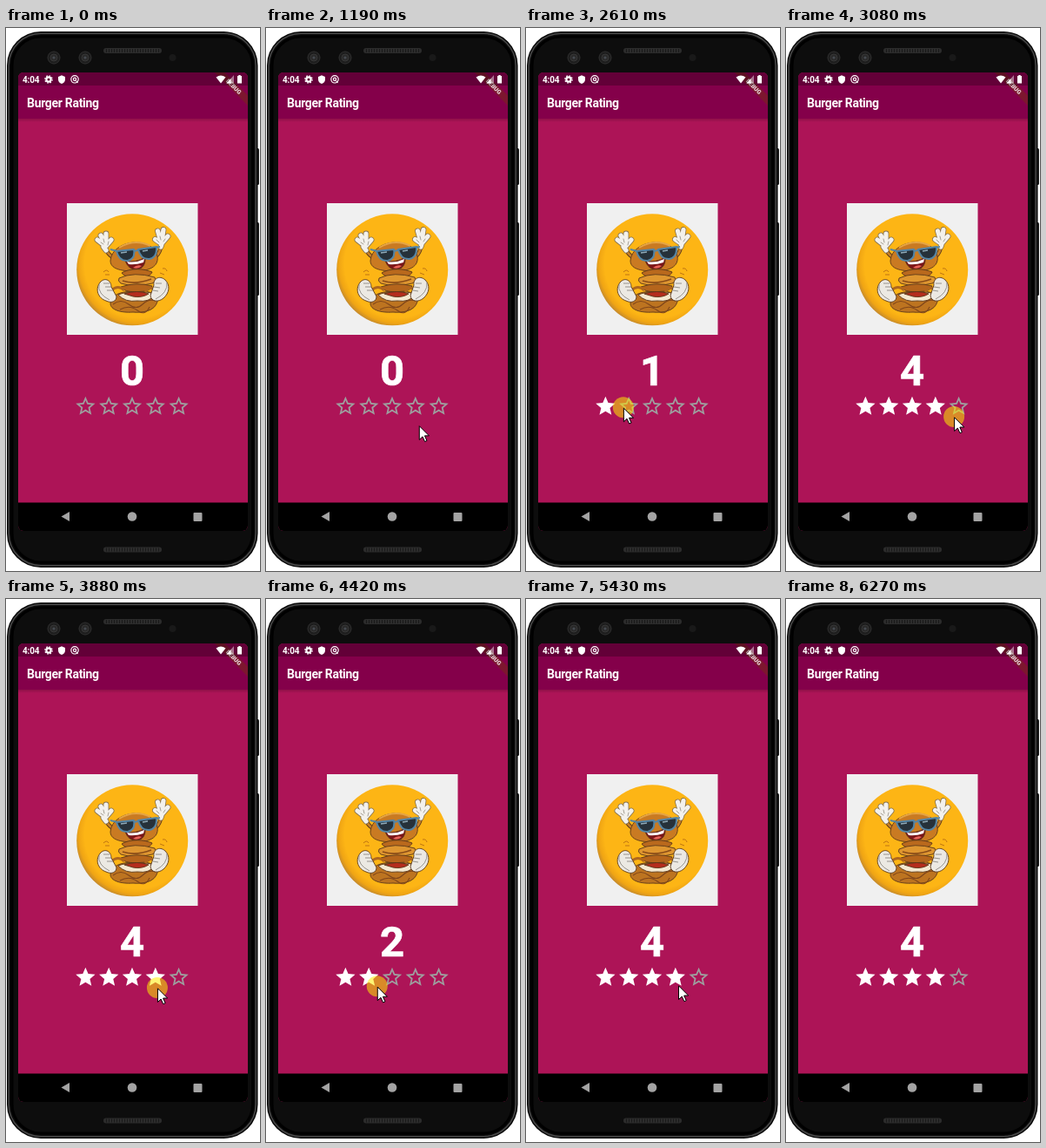
An HTML page for the animation above (6.92 s loop, 292 px wide and 623 px high).

```html
<!DOCTYPE html>
<html lang="en">
<head>
<meta charset="utf-8">
<title>Burger Rating</title>
<style>
  html, body { margin: 0; width: 100%; height: 100%; overflow: hidden; background: #fff; }
  svg { display: block; width: 100%; height: 100%; font-family: Roboto, sans-serif; }
</style>
</head>
<body>
<svg viewBox="0 0 292 623">
  <defs>
    <radialGradient id="badge" cx=".55" cy=".45" r=".57">
      <stop offset=".84" stop-color="#fdb515"/>
      <stop offset=".93" stop-color="#f0a514"/>
      <stop offset="1" stop-color="#c4892c"/>
    </radialGradient>
    <linearGradient id="shade" x2="0" y2="1">
      <stop stop-color="#000" stop-opacity=".18"/>
      <stop offset="1" stop-color="#000" stop-opacity="0"/>
    </linearGradient>
    <clipPath id="screen"><rect x="14" y="51" width="264" height="526" rx="6"/></clipPath>
    <g id="lens">
      <circle r="7" fill="#1d1d1d" stroke="#303030"/>
      <circle r="4" fill="#292929" stroke="#3d3d3d" stroke-width=".8"/>
      <circle r="1.6" fill="#454a50"/>
    </g>
    <g id="speaker" fill="none" stroke-linecap="round">
      <path d="M115 0H176" stroke="#2c2c2c" stroke-width="6"/>
      <path d="M115 0H177" stroke="#191919" stroke-width="4" stroke-dasharray="1 2" stroke-linecap="butt"/>
    </g>
    <path id="fingersL" d="M114 250L105 243M114 248L109 238M115 247L115 236M115 250L121 243M112 251L115 255"/>
    <path id="fingersR" d="M178 247L171.500 242.500M178 245L174.500 233M179 245L181 231.500M180 246L186 239M179 248L178 251"/>
    <path id="shoeL" d="M108 292C114 285 121 290 121 297L127 308C127 314 121 316 115 313C106 310 102 300 108 292Z"/>
    <path id="shoeR" d="M183 289C176 283 169 288 170 295L166 307C167 314 175 315 181 310C188 304 189 295 183 289Z"/>
  </defs>

  <!-- phone -->
  <rect x="286" y="138" width="5" height="42" rx="1.500" fill="#1c1c1c"/>
  <rect x="286" y="223" width="5" height="84" rx="1.500" fill="#1c1c1c"/>
  <rect x="1" y="4" width="288.500" height="615" rx="39" fill="#080808"/>
  <rect x="3.200" y="6.200" width="284" height="610.500" rx="37" fill="#0b0b0b" stroke="#484848" stroke-width="1.500"/>
  <rect x="7" y="10" width="276.500" height="603" rx="33" fill="#0d0d0d" stroke="#000" stroke-width="3"/>
  <use href="#lens" x="55" y="34"/>
  <use href="#lens" x="91" y="34"/>
  <circle cx="191.500" cy="34" r="4" fill="#191919"/>
  <use href="#speaker" y="26"/>
  <use href="#speaker" y="598.500"/>

  <!-- app -->
  <g clip-path="url(#screen)">
    <rect x="14" y="51" width="264" height="526" fill="#ad1457"/>
    <rect x="14" y="104" width="264" height="4" fill="url(#shade)"/>
    <rect x="14" y="51" width="264" height="53" fill="#84004a"/>
    <text x="24" y="90.700" font-size="14" font-weight="600" letter-spacing="-.3" fill="#fff">Burger Rating</text>
    <g transform="translate(278 51) rotate(45)">
      <rect x="-27" y="18.800" width="54" height="8.100" fill="#7c1c28" fill-opacity=".8"/>
      <text y="25.300" font-size="6.800" font-weight="900" fill="#fff" fill-opacity=".85" text-anchor="middle">DEBUG</text>
    </g>
    <rect x="14" y="51" width="264" height="15" fill-opacity=".25"/>
    <g fill="#fff">
      <text x="19" y="62.700" font-size="10" font-weight="600" letter-spacing="-.2">4:04</text>
      <circle cx="49" cy="59" r="2.600" fill="none" stroke="#fff" stroke-width="2.200"/>
      <circle cx="49" cy="59" r="4.200" fill="none" stroke="#fff" stroke-width="1.200" stroke-dasharray="1.650"/>
      <path d="M64 54.300L68 56V59C68 61.500 66.300 63.300 64 64C61.700 63.300 60 61.500 60 59V56Z"/>
      <g fill="none" stroke="#fff" stroke-width="1.200">
        <circle cx="79" cy="58.800" r="4.200"/>
        <circle cx="79" cy="58.800" r="1.600"/>
        <path d="M80.500 60.500L82.500 63"/>
      </g>
      <path d="M241.500 56.500Q247 52.300 252.500 56.500L247 63.500Z"/>
      <path d="M262 54V63.500H253.500Z" fill-opacity=".45"/>
      <path d="M258.500 58V63.500H253.500Z"/>
      <path d="M266 55H267.300V54H269.700V55H271V63.500H266Z"/>
    </g>

    <!-- picture -->
    <rect x="70" y="201" width="150.500" height="151" fill="#f0f0f0"/>
    <circle cx="145.200" cy="277.300" r="64" fill="url(#badge)"/>
    <g stroke="#5a371a" stroke-width=".9" stroke-linejoin="round">
      <g fill="none" stroke-linecap="round">
        <path d="M115 254Q119 263 128 265M178 251Q177 259 170 264" stroke-width="4.500"/>
        <path d="M115 254Q119 263 128 265M178 251Q177 259 170 264" stroke="#c9822a" stroke-width="2.800"/>
        <g stroke="#85714f" stroke-width="6.800"><use href="#fingersL"/><use href="#fingersR"/></g>
        <g stroke="#f3f1ec" stroke-width="5.200"><use href="#fingersL"/><use href="#fingersR"/></g>
        <path d="M109 246L112 248M112 242L113 246M118 245L117 249M173 243L176 246M177 239L178 243M183 242L181 245" stroke="#9b968c"/>
      </g>
      <path d="M120 267C122 242 169 238 174 262C176 274 164 279 148 279C131 279 120 276 120 267Z" fill="#c97a22"/>
      <path d="M130 252Q148 241 166 250" fill="none" stroke="#e6a544" stroke-width="2"/>
      <path d="M137 267Q149 270 160 263Q161 275 151 277Q141 278 137 267Z" fill="#7c1518"/>
      <path d="M139 268Q149 270 159 265L158 269Q149 272 141 271Z" fill="#fff" stroke="none"/>
      <path d="M146 275Q151 271 156 273Q152 277 146 275Z" fill="#e4635a" stroke="none"/>
      <g fill="#26313a" stroke="#5485a5" stroke-width="2">
        <path d="M127 256L147 254Q149 265 140 267Q130 268 127 256Z"/>
        <path d="M152 254L173 251Q174 263 165 265Q155 266 152 254Z"/>
        <path d="M120 254L128 256M147 256L152 255M173 252L177 251" fill="none"/>
      </g>
      <path d="M132 258L139 257M157 256L163 255" stroke="#8fa9b7" stroke-width="1.500"/>

      <path d="M133 281C142 275 160 276 168 280C166 288 138 289 133 281Z" fill="#b9691d"/>
      <path d="M130 287Q147 279 171 286Q173 291 168 293Q148 298 132 293Q128 290 130 287Z" fill="#de9630"/>
      <path d="M134 290Q149 295 167 288" fill="none" stroke="#8a4c18" stroke-width="1.600"/>
      <path d="M132 297Q150 291 168 296Q166 303 151 303Q135 303 132 297Z" fill="#b5651c"/>
      <path d="M120 316C121 304 138 301 150 303C165 300 176 306 174 314C171 325 157 327 146 326C131 327 120 323 120 316Z" fill="#bd7420"/>
      <path d="M129 306Q138 302 151 305Q164 301 171 306Q165 315 151 313Q137 315 129 306Z" fill="#f4e8cf"/>
      <path d="M136 305Q151 300 164 305Q156 310 146 308Z" fill="#b52d1d"/>
      <path d="M123 317Q132 310 141 317T157 317T172 313M131 323Q142 317 151 324T165 320" fill="none" stroke="#80461a" stroke-width="1.100"/>
      <path d="M121 301Q129 294 136 301M170 299Q163 297 160 303" fill="none" stroke="#b0671d" stroke-width="3"/>
      <g fill="#ece9e3"><use href="#shoeL"/><use href="#shoeR"/></g>
      <g fill="none" stroke="#8d8a84">
        <path d="M107 294Q105 305 119 312M185 292Q186 304 172 311"/>
        <path d="M112 293L119 293M114 297L121 297M116 301L123 301M172 293L179 293M170 297L177 298M169 301L175 302"/>
      </g>
      <path d="M112 280Q116 276 118 280M114 283L119 283M180 276Q184 275 185 279M177 281L182 283" fill="none" stroke="#b76b12"/>
    </g>

    <text id="score" x="145" y="409.500" font-size="49" font-weight="700" fill="#fff" stroke="#fff" stroke-width=".7" text-anchor="middle">0</text>
    <g id="stars"></g>

    <!-- navigation bar -->
    <rect x="14" y="544.500" width="264" height="33"/>
    <g fill="#a3a3a3">
      <path d="M63.500 560.500L73 555V566Z"/>
      <circle cx="145" cy="560.500" r="5.300"/>
      <rect x="215.500" y="556" width="10" height="10" rx="1"/>
    </g>
  </g>

  <g id="pointer">
    <circle id="press" r="12" fill="#fe0" fill-opacity=".54"/>
    <path d="M.5 .8V16.500L4.200 13L6.800 18.700L9.200 17.700L6.700 12H11.700Z" fill="#fff" stroke="#000"/>
  </g>
</svg>

<script>
const LOOP = 6920;
const ENTER = 700, PRESS = 2120, RELEASE = 5420, LEAVE = 6265;
const ROW_X = 78, ROW_Y = 420.4, STAR = 26.8;
const FULL = 'M12 17.27L18.18 21l-1.64-7.03L22 9.24l-7.19-.61L12 2 9.19 8.63 2 9.24l5.46 4.73L5.82 21z';
const HOLLOW = FULL + 'M12 15.4l-3.76 2.27 1-4.28-3.32-2.88 4.38-.38L12 6.1l1.71 4.04 4.38.38-3.32 2.88 1 4.28z';

// Pointer path: time, x, y
const path = [
  [700, 289, 584], [1190, 176, 456], [1390, 132, 437], [1840, 89, 431],
  [2310, 89, 431], [3010, 177, 445], [3080, 193, 446], [3210, 204, 447],
  [3500, 204, 447], [3880, 174, 446], [4190, 152, 446], [4690, 109, 442],
  [4920, 109, 442], [5060, 139, 441], [5430, 175, 443],
  [5790, 175, 443], [6270, 279, 624]
];

const $ = id => document.getElementById(id);
const score = $('score'), pointer = $('pointer'), press = $('press');

$('stars').innerHTML = [0, 1, 2, 3, 4].map(i =>
  `<path fill-rule="evenodd" transform="translate(${ROW_X + i * STAR} ${ROW_Y}) scale(${STAR / 24})"/>`
).join('');
const stars = [...$('stars').children];

const slope = (i, k) => (path[i + 1][k] - path[i][k]) / (path[i + 1][0] - path[i][0]);

// Monotone tangent: flat at holds and turning points
function tangent(i, k) {
  if (i === 0) return slope(0, k);
  if (i === path.length - 1) return slope(i - 1, k);
  const a = slope(i - 1, k), b = slope(i, k);
  return a * b > 0 ? 2 * a * b / (a + b) : 0;
}

function at(t, k) {
  const last = path.length - 1;
  if (t <= path[0][0]) return path[0][k];
  if (t >= path[last][0]) return path[last][k];
  const i = path.findIndex(p => p[0] > t) - 1;
  const h = path[i + 1][0] - path[i][0];
  const u = (t - path[i][0]) / h, v = 1 - u;
  return v * v * ((1 + 2 * u) * path[i][k] + u * h * tangent(i, k))
       + u * u * ((1 + 2 * v) * path[i + 1][k] - v * h * tangent(i + 1, k));
}

function ratingAt(t) {
  if (t < PRESS) return 0;
  const x = at(Math.min(t, RELEASE), 1);
  return Math.max(0, Math.min(5, Math.round((x - ROW_X) / STAR)));
}

const show = (el, on) => el.setAttribute('visibility', on ? 'visible' : 'hidden');

function draw(t) {
  const rating = ratingAt(t), pressed = t >= PRESS && t < RELEASE;
  score.textContent = rating;
  stars.forEach((star, i) => {
    star.setAttribute('d', i < rating ? FULL : HOLLOW);
    star.setAttribute('fill', i < rating ? '#fff' : '#9e9e9e');
  });
  show(pointer, t >= ENTER && t < LEAVE);
  show(press, pressed);
  pointer.setAttribute('transform', `translate(${at(t, 1)} ${at(t, 2)})`);
}

function tick() {
  draw(performance.now() % LOOP);
  requestAnimationFrame(tick);
}
tick();
</script>
</body>
</html>
```
